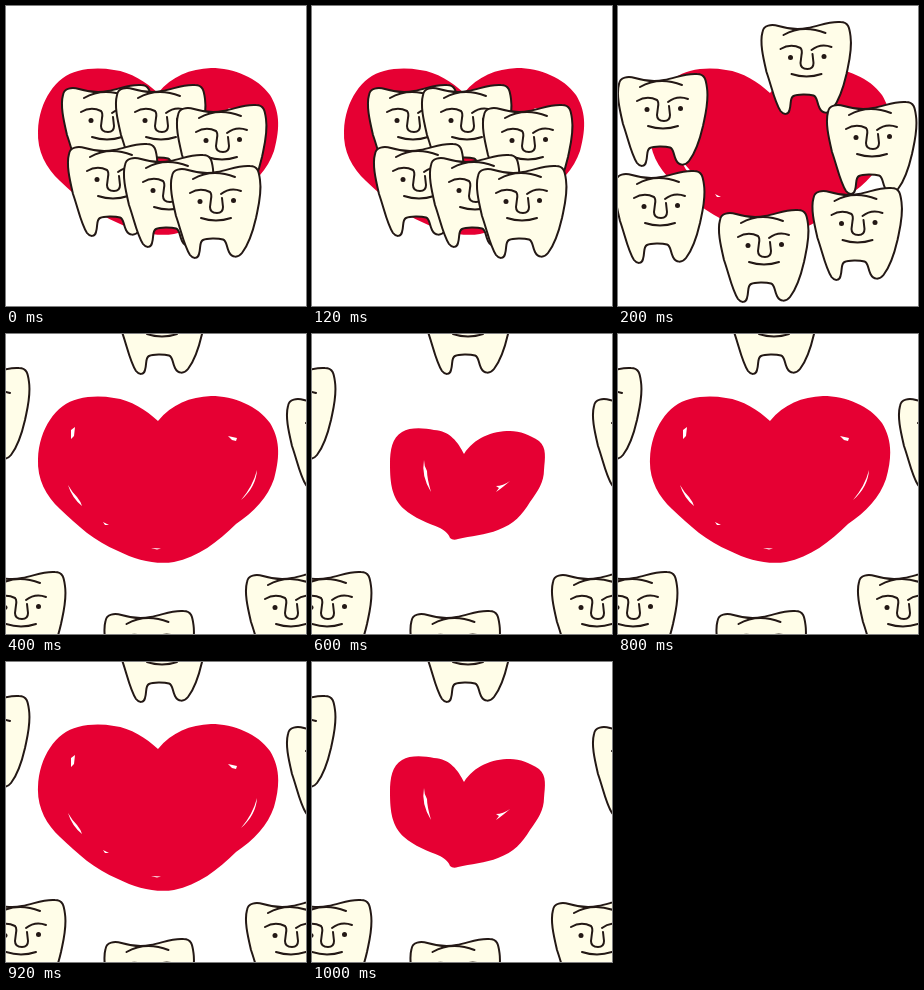
Animation of 300 by 300 pixels, one loop 1.2 s. Source, as an HTML page:

```html
<!DOCTYPE html>
<html lang="en">
<head>
<meta charset="utf-8">
<title>Teeth and heart</title>
<style>
  html, body { margin: 0; width: 100%; height: 100%; overflow: hidden; background: #fff; }
  svg { display: block; width: 100vw; height: 100vh; }
  .line { fill: none; stroke: #231815; stroke-width: 2; stroke-linecap: round; stroke-linejoin: round; }
  .heart { fill: #e60033; }
  .glint { fill: #fff; }
</style>
</head>
<body>
<svg viewBox="0 0 300 300">
  <defs>
    <g id="tooth">
      <path class="line" style="fill:#fffde8" d="M-44 -36 C-43 -43 -35 -44 -28 -42 C-18 -39 -8 -38 1 -40
        C13 -42 22 -47 34 -46 C42 -46 43 -40 44 -32 C46 -18 42 -4 40 6 C37 19 33 32 26 41
        C22 46 16 46 13 40 C10 34 11 29 7 27.500 C2 26 -9 26 -13 28 C-17 30 -15 36 -17 42
        C-18 47 -23 47 -26 43 C-32 34 -35 18 -40 4 C-43 -9 -47 -25 -44 -36 Z"/>
      <path class="line" d="M-23 -33 Q-4 -44 19 -35"/>
      <path class="line" d="M-26 -19 Q-16 -25 -6 -20 Q-4 -18 -5 -13 L-6 -5 Q-6 1 1 1 Q7 1 7 -5 L6 -14"/>
      <path class="line" d="M5 -18 Q14 -25 25 -21"/>
      <path class="line" d="M-15 6 Q0 11 15 6"/>
      <g fill="#231815"><circle cx="-16" cy="-10.500" r="2.500"/><circle cx="17.500" cy="-11.500" r="2.500"/></g>
    </g>
  </defs>
  <g id="big">
    <path class="heart" d="M152 87 C140 76 125 66 108 64 C96 62 84 62 72 65 C50 70 33 95 32 125
      C31 145 40 162 54 175 C72 192 88 207 112 217 C130 226 150 231 168 228 C192 223 212 208 230 190
      C248 178 262 163 268 145 C275 120 273 104 264 89 C252 72 228 62 205 62 C184 63 166 70 152 87 Z"/>
    <path class="glint" d="M69 93 L65 96 L65 105 L68 102 Z M222 102 L231 104 L230 107 L226 106 Z
      M62 151 Q66 164 76 172 Q75 168 71 163 Q66 158 62 151 Z M251 136 Q250 153 235 166 Q247 152 251 136 Z
      M97 188 L103 191 L99 191 Z M145 214 L155 214.500 L151 215.500 Z"/>
  </g>
  <g id="small">
    <path class="heart" d="M152 120 C146 108 138 97 122 96 C112 94 98 93 90 98 C80 104 78 116 78 130
      C78 150 80 164 92 175 C102 184 116 189 128 194 C134 197 137 201 138 204 Q141 207 146 205
      C158 202 174 201 186 196 C202 190 210 181 218 168 C226 157 232 148 232 136
      C233 124 235 114 227 107 C218 101 208 97 198 97 C180 97 162 104 152 120 Z"/>
    <path class="glint" d="M112 126 Q109 142 119 158 Q115 144 115 137 Q112 132 112 126 Z
      M184 152 Q191 152 198 147 Q190 154 184 158 L187 154 Z"/>
  </g>
  <g id="teeth"></g>
</svg>
<script>
  const STEP = 200, STEPS = 6;
  const byId = id => document.getElementById(id);

  // Tooth centres, back to front: huddled, spreading, scattered
  const poses = [
    [[101, 125], [155, 125], [216, 145], [107, 184], [163, 195], [210, 206]],
    [[45, 114], [188.5, 62], [254, 142], [42, 211], [146, 250], [239.5, 228]],
    [[-21, 80], [156, -6], [326, 108], [15, 284], [143.5, 323], [285, 284]]
  ];

  const teeth = poses[0].map(() => {
    const use = document.createElementNS("http://www.w3.org/2000/svg", "use");
    use.setAttribute("href", "#tooth");
    return byId("teeth").appendChild(use);
  });

  function draw(ms) {
    const step = Math.floor(ms / STEP) % STEPS;
    const pose = poses[Math.min(step, 2)];
    teeth.forEach((tooth, i) => tooth.setAttribute("transform", `translate(${pose[i]})`));
    const shrunk = step >= 3 && step % 2 === 1;
    byId("big").style.display = shrunk ? "none" : "";
    byId("small").style.display = shrunk ? "" : "none";
  }

  const start = performance.now();
  function tick() {
    draw(performance.now() - start);
    requestAnimationFrame(tick);
  }
  tick();
</script>
</body>
</html>
```
